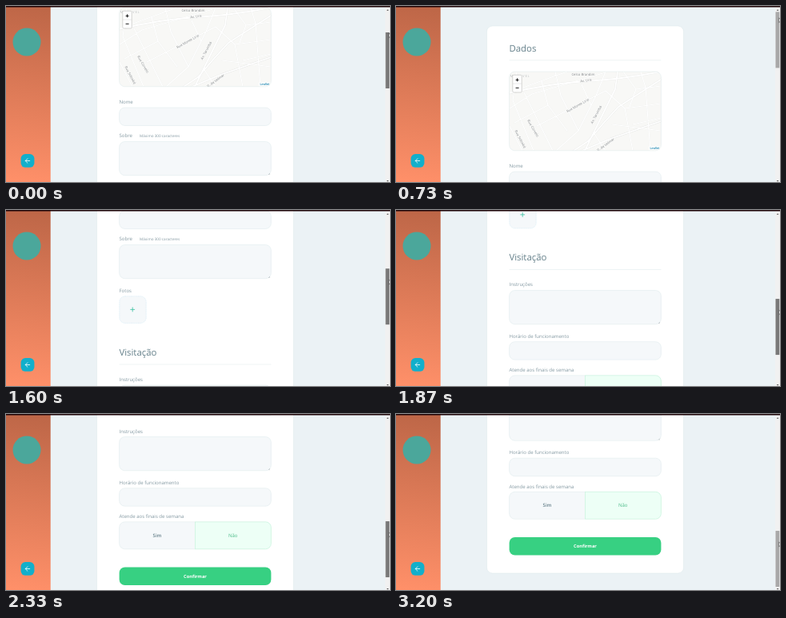
Write an HTML page that moves like this. It is 480 by 220 pixels and loops after 4.07 s.

```html
<!DOCTYPE html>
<html lang="pt-BR">
<head>
<meta charset="utf-8">
<title>Dados</title>
<style>
  html, body { margin: 0; width: 100%; height: 100%; overflow: hidden; background: #ebf2f5; }
  svg { display: block; width: 480px; height: 220px; }
  text { font-family: "Open Sans", "Noto Sans", sans-serif; text-rendering: geometricPrecision; }
  .legend { font-size: 11.4px; font-weight: 500; fill: #66818b; }
  .label { font-size: 6.05px; font-weight: 500; fill: #8499a2; }
  .hint { font-size: 4.65px; font-weight: 500; fill: #8499a2; }
  .mid { text-anchor: middle; }
  .option { font-size: 6.05px; }
  .field { fill: #f5f8fa; stroke: #d3e2e5; stroke-width: .4; }
  .rule { stroke: #d3e2e5; stroke-width: .4; }
  .grip { stroke: #8a9499; stroke-width: .4; }
  .roads { fill: none; stroke-linecap: round; stroke-linejoin: round; }
  .streets text { font-size: 4.3px; fill: #7d8082; text-anchor: middle; stroke: #fff; stroke-width: .6; paint-order: stroke; }
  .zoom { font: bold 8px "Liberation Sans", Arial, sans-serif; fill: #000; text-anchor: middle; }
  .credit { font: 4px "Liberation Sans", Arial, sans-serif; fill: #0078a8; }
</style>
</head>
<body>
<svg viewBox="0 0 480 220">
  <defs>
    <linearGradient id="side" gradientUnits="userSpaceOnUse" x1="38" y1="0" x2="14" y2="220">
      <stop offset="0" stop-color="#bd6647"/>
      <stop offset="1" stop-color="#ff9069"/>
    </linearGradient>
    <clipPath id="mapClip"><rect x="141.6" y="82" width="189.8" height="98.8" rx="7"/></clipPath>
    <clipPath id="pair"><rect x="141.6" y="531.3" width="189.8" height="34" rx="7"/></clipPath>
    <path id="minor" d="M142 108L214 82M142 128L170 110 262 83M158 181L142 150M172 181L146 118 151 82
      M196 181L160 108M148 146L190 124 214 156M190 124L182 94M176 150L262 106M200 181L228 156 206 112 199 82
      M228 156L244 124 232 98M262 82L250 112 244 124M262 106L286 128 331 122M286 128L296 181M270 148L331 156
      M284 82L300 104 331 100M300 104L292 126M306 82L312 102 318 181M331 140L296 148M248 160L262 181"/>
    <path id="major" d="M142 109Q190 97 238 94T331 82M222 181L240 169 258 148 278 126 331 92M236 181L262 128 274 104 277 82M232 181L268 166 331 144"/>
    <path id="grip" class="grip" d="M328 0l2-2M329.2 0l.8-.8"/>
  </defs>

  <rect width="480" height="220" fill="#ebf2f5"/>
  <g id="page">
    <rect x="113.5" y="25" width="246" height="608" rx="7" fill="#fff" stroke="#d3e2e5" stroke-width=".4"/>

    <text class="legend" x="141.4" y="57">Dados</text>
    <path class="rule" d="M141.6 67.8h189.8"/>

    <g clip-path="url(#mapClip)">
      <rect x="141" y="82" width="191" height="99" fill="#f8f8f6"/>
      <g class="roads">
        <use href="#minor" stroke="#eeefed" stroke-width="1.7"/>
        <use href="#major" stroke="#e6e7e5" stroke-width="2.4"/>
        <use href="#minor" stroke="#fff" stroke-width="1.2"/>
        <use href="#major" stroke="#fff" stroke-width="1.8"/>
      </g>
      <g class="streets">
        <text x="155" y="88.5" style="letter-spacing:.8px;fill:#b5b8b9">MORAVEL</text>
        <text x="234" y="86.5">Celso Brandim</text>
        <text transform="translate(237.5 94.5) rotate(-9)">Av. Lira</text>
        <text transform="translate(228 125.5) rotate(-29)">Rua Monte Lirio</text>
        <text transform="translate(251.5 136.5) rotate(-62)">Av. Tarumbá</text>
        <text transform="translate(170 153.5) rotate(60)">Rua Corvelo</text>
        <text transform="translate(154 167) rotate(62)">Rua Solimbé</text>
        <text transform="translate(263 174.5) rotate(-36)">R. de Velmar</text>
      </g>
      <rect x="145.8" y="86.2" width="11.4" height="21.8" rx="1.5" fill="#fff" stroke="#c4c4c2" stroke-width=".7"/>
      <path d="M146 97.1h11" stroke="#ccc" stroke-width=".4"/>
      <text class="zoom" x="151.5" y="95">+</text>
      <text class="zoom" x="151.5" y="105.4">−</text>
      <rect x="315.8" y="175.2" width="16" height="6" fill="#fff" opacity=".7"/>
      <text class="credit" x="317.4" y="179.4">Leaflet</text>
    </g>
    <rect x="141.6" y="82" width="189.8" height="98.8" rx="7" fill="none" stroke="#d3e2e5" stroke-width=".4"/>

    <text class="label" x="141.5" y="202">Nome</text>
    <rect class="field" x="141.6" y="207" width="189.8" height="22.5" rx="7"/>

    <text class="label" x="141.5" y="244.4">Sobre</text>
    <text class="hint" x="167" y="243.9">Máximo 300 caracteres</text>
    <rect class="field" x="141.6" y="249.5" width="189.8" height="42.2" rx="7"/>
    <use href="#grip" y="291"/>

    <text class="label" x="141.5" y="308.6">Fotos</text>
    <rect x="141.8" y="313.8" width="33.4" height="33.6" rx="7" fill="#f5f8fa" stroke="#b9dff0" stroke-width=".4" stroke-dasharray="1.1 .7"/>
    <path d="M155.7 330.4h5M158.2 327.9v5" stroke="#37c0a0" stroke-width=".8" stroke-linecap="round"/>

    <text class="legend" x="141.4" y="388">Visitação</text>
    <path class="rule" d="M141.6 399h189.8"/>

    <text class="label" x="141.5" y="420">Instruções</text>
    <rect class="field" x="141.6" y="425" width="189.8" height="42.3" rx="7"/>
    <use href="#grip" y="466.6"/>

    <text class="label" x="141.5" y="484.3">Horário de funcionamento</text>
    <rect class="field" x="141.6" y="489.2" width="189.8" height="22.5" rx="7"/>

    <text class="label" x="141.5" y="526.5">Atende aos finais de semana</text>
    <g clip-path="url(#pair)">
      <rect x="141" y="531" width="95.5" height="35" fill="#f5f8fa"/>
      <rect x="236.5" y="531" width="96" height="35" fill="#edfff6"/>
    </g>
    <path d="M236.5 531.3H148.6a7 7 0 0 0-7 7v20a7 7 0 0 0 7 7H236.5" fill="none" stroke="#d3e2e5" stroke-width=".4"/>
    <path d="M236.5 531.3H324.4a7 7 0 0 1 7 7v20a7 7 0 0 1-7 7H236.5z" fill="none" stroke="#a1e9c5" stroke-width=".4"/>
    <text class="option mid" x="189" y="550.4" fill="#66808a" font-weight="600">Sim</text>
    <text class="option mid" x="283.7" y="550.4" fill="#52bd8d" font-weight="500">Não</text>

    <rect x="141.6" y="588" width="189.8" height="22.5" rx="7" fill="#37d082"/>
    <text class="mid" x="236.5" y="601.3" fill="#fff" font-size="5.65" font-weight="700">Confirmar</text>
  </g>

  <rect width="55.7" height="220" fill="url(#side)"/>
  <circle cx="26" cy="45" r="17.5" fill="#4ba79b"/>
  <rect x="18.6" y="185" width="16.8" height="16.8" rx="5.6" fill="#12afcb"/>
  <path d="M29.7 193.5h-5.4m2.6-2.7l-2.7 2.7 2.7 2.7" fill="none" stroke="#fff" stroke-width=".8" stroke-linecap="round" stroke-linejoin="round"/>

  <rect x="474" width="6" height="220" fill="#f1f1f1"/>
  <path d="M475.7 5.8l1.4-1.6 1.4 1.6zM475.7 217.9l1.4 1.6 1.4-1.6z" fill="#505050"/>
  <rect id="thumb" x="474.5" width="4.8" height="70"/>
  <path id="cursor" d="M0 0v5.8l1.4-1.3 1 2.2 1-.4-1-2.2h1.8z" fill="#fff" stroke="#222" stroke-width=".5"/>
  <rect width="480" height="1.5" fill="#1d0508"/>
</svg>
<script>
  const LOOP = 4070, STEPS = 61;
  // [step, scroll offset, speed per step]
  const scrollKeys = [
    [0, 80, -5], [4, 6, -3], [8, 0, 0], [18, 0, 0], [19, 2, 4],
    [24, 206, 36], [31, 374, 10], [35, 396.5, 6], [41, 434, 0], [61, 434, 0]
  ];
  const [page, thumb, cursor] = ['page', 'thumb', 'cursor'].map(id => document.getElementById(id));
  const start = performance.now();

  function scrollAt(n) {
    const i = scrollKeys.findIndex(k => k[0] > n);
    const [n0, y0, v0] = scrollKeys[i - 1], [n1, y1, v1] = scrollKeys[i];
    const d = n1 - n0, u = (n - n0) / d, w = 1 - u;
    return y0 * w * w * (1 + 2 * u) + y1 * u * u * (3 - 2 * u) + d * u * w * (v0 * w - v1 * u);
  }

  function draw() {
    const t = (performance.now() - start) % LOOP;
    const n = Math.min(STEPS - 1, Math.floor((t + 6) / LOOP * STEPS));
    const y = scrollAt(n), top = 7.4 + y / 3.13;
    const held = n < 9 || (n >= 19 && n < 48);
    const grab = 1 + 13 * Math.min(1, Math.max(0, (n - 8) / 6));
    page.setAttribute('transform', `translate(0 ${-y})`);
    thumb.setAttribute('y', top);
    thumb.setAttribute('fill', held ? '#787878' : '#a8a8a8');
    cursor.setAttribute('transform', `translate(478.7 ${top + grab})`);
    requestAnimationFrame(draw);
  }
  draw();
</script>
</body>
</html>
```
